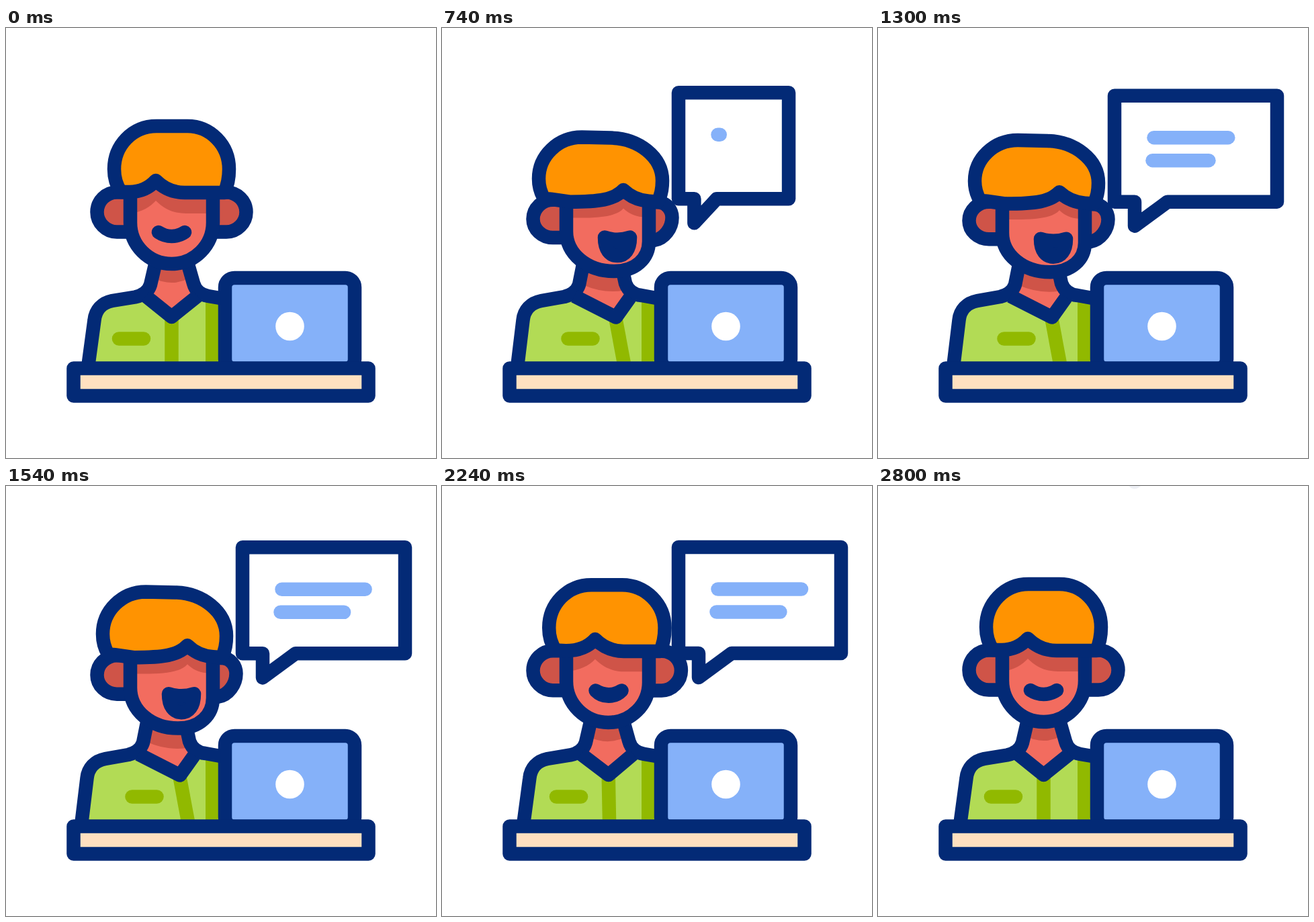
Recreate the animation shown at these times as an HTML page. Size 640 by 640 pixels, loop 3600 ms.

```html
<!DOCTYPE html>
<html lang="en">
<head>
<meta charset="utf-8">
<title>Chat at the desk</title>
<style>
html, body { margin: 0; width: 100%; height: 100%; overflow: hidden; background: #fff; }
svg { display: block; width: 100vw; height: 100vh; }
.ink { stroke: #032a76; stroke-width: 20.5; stroke-linejoin: round; }
.round { stroke-linecap: round; stroke-width: 20.5; }
</style>
</head>
<body>
<svg viewBox="0 0 640 640" fill="none">
  <g id="bubble">
    <path id="box" class="ink" fill="#fff"/>
    <path id="line1" class="round" stroke="#85b1f9"/>
    <path id="line2" class="round" stroke="#85b1f9"/>
  </g>
  <g id="man"></g>
  <rect class="ink" x="326" y="372" width="193" height="135" rx="14" fill="#85b1f9"/>
  <circle cx="422.5" cy="444" r="21.3" fill="#fff"/>
  <rect class="ink" x="100.5" y="506.5" width="439" height="41" fill="#ffe0c0"/>
</svg>
<script>
const LOOP = 3600, SKIN = '#f26c5f', SHADE = '#cf5448', GREEN = '#b2db55', MOSS = '#91b900', HAIR = '#ff9301';
const $ = id => document.getElementById(id);
const lerp = (a, b, p) => a + (b - a) * p;
const ease = (t, from, to) => {
  const u = Math.min(1, Math.max(0, (t - from) / (to - from)));
  return u * u * (3 - 2 * u);
};

// Each part: upright path, leaning path, attributes, whether it bobs with the head.
const parts = [];
function part(attrs, upright, leaning, bobs) {
  const el = document.createElementNS('http://www.w3.org/2000/svg', 'path');
  for (const name in attrs) el.setAttribute(name, attrs[name]);
  $('man').append(el);
  parts.push({ el, upright, goal: leaning.match(/[\d.]+/g).map(Number), bobs });
}
const ink = fill => ({ class: 'ink', fill });

// Neck
part({ fill: SKIN },
  'M222 345 L215 382 L208 399 L246.5 430 L285 399 L279 380 L271 345 Z',
  'M210 345 L204 382 L198 399 L259 430 L280 401 L273 380 L268 345 Z');
part({ fill: SHADE },
  'M220 345 L219 372 Q246 386 274 372 L272 345 Z',
  'M209 345 L210 381 Q238 394 269 390 L269 345 Z', true);

// Shirt
part({ fill: GREEN },
  'M123 500 L131.5 435 C133 420 143 409 158 406 L208 399 L246.5 430 L285 399 L330 404 L330 500 Z',
  'M113 500 L120.5 435 C122 420 132 409 148 406 L198 399 L259 430 L280 401 L330 404 L330 500 Z');
part({ fill: MOSS },
  'M297 400 L330 404 L330 500 L297 500 Z',
  'M297 400 L330 404 L330 500 L297 500 Z');
part({ stroke: MOSS, 'stroke-width': 20.5 }, 'M246.5 430 L246.5 500', 'M258 430 L271 500');
part({ stroke: MOSS, class: 'round' }, 'M168 462.5 L205 462.5', 'M187.5 462.5 L224.5 462.5');
part(ink('none'),
  'M122 505 L131.5 435 C133 420 143 409 158 406 L192 400.5 C204 398 212 392 215 382 L222 352',
  'M112 505 L120.5 435 C122 420 132 409 148 406 L182 400 C194 397 201 391 204 382 L210 352');
part(ink('none'),
  'M271 352 L279 380 C282 391 290 397 301 399 L330 404',
  'M267 352 L273 380 C277 391 285 397 297 398 L330 404');
part(ink('none'), 'M208 399 L246.5 430 L285 399', 'M197 399 L259 430.5 L280 401');

// Ears
part(ink(SHADE),
  'M185 244.5 L165 244.5 C149 244.5 135.5 257.5 135.5 274 C135.5 290 149 303.5 165 303.5 L185 303.5',
  'M185 251 L165 252 C149 252 135.5 265 135.5 281 C135.5 297 149 309.5 165 309.5 L185 309.5', true);
part(ink(SHADE),
  'M308 244.5 L328 244.5 C344 244.5 357.5 257.5 357.5 274 C357.5 290 344 303.5 328 303.5 L308 303.5',
  'M308 255 L324 256 C334 257 342.5 267 342.5 279 C342.5 295 331 311 316 313.5 L308 314', true);

// Face
const face = [
  'M185 245 L185 289.5 C185 323.5 212.5 351 246.5 351 C280.5 351 308 323.5 308 289.5 L308 245',
  'M185 250 L185 300 C185 334 216 360.5 256 360.5 C288 360.5 308 341 308 315 L308 250'];
part({ fill: SKIN }, ...face, true);
part({ fill: SHADE },
  'M185 276 C202 274 215 266 223 257 C236 270 250 276 268 276 L308 276 L308 235 L185 235 Z',
  'M185 279 C220 280 258 280 270 265 C277 272 286 277 298 278 L308 279 L308 245 L185 245 Z', true);
part(ink('none'), ...face, true);
part(ink('#032a76'),
  'M227 304 C239 312 254 312 266 304 C260 308 253 310 246.5 310 C240 310 233 308 227 304 Z',
  'M242 309 C254 313 268 313 280 309 C280 328 272 337 261 337 C250 337 242 328 242 309 Z', true);

// Hair
part(ink(HAIR),
  'M171 244 C164 234 161 222 161 210 C161 175 188 146 224 146 L270 146 C304 146 332 174 332 210 C332 223 330 234 325 245 L266 245 C250 245 235 239 223 227 C213 238 199 244 184 244 L176 244 Z',
  'M152 250 C146 240 144 230 144 220 C144 185 173 157 208 157 L252 158 C292 159 328 186 328 223 C328 235 326 246 321 255 L308 254 C294 253 280 247 270 237 C256 252 234 255 190 255 L162 251 Z', true);

function drawMan(lean, bob) {
  for (const { el, upright, goal, bobs } of parts) {
    let i = 0;
    el.setAttribute('d', upright.replace(/[\d.]+/g, n => {
      let v = lerp(+n, goal[i], lean);
      if (bobs && i % 2) v += (440 - v) * bob * lean * 0.0037;
      i++;
      return v.toFixed(2);
    }));
  }
}

function drawBubble(t, bob) {
  const grow = ease(t, 240, 490), wide = ease(t, 510, 910);
  $('bubble').style.display = t > 240 ? '' : 'none';
  $('bubble').style.opacity = Math.min(1, 1 - (t - 2620) / 192);
  const lift = -291 * ease(t, 2320, 2820);
  const y = v => 354 + grow * (v + bob - 354) + lift;
  const x = (narrow, full) => lerp(narrow, full, wide);
  const right = x(393.3, 594), tail = x(365, 382), joint = x(374, 431);
  $('box').setAttribute('d', `M352 ${y(91)} H${right} V${y(249)} H${joint} L${tail} ${y(285)} V${y(249)} H352 Z`);

  const stretch = 1 - 0.0098 * (bob + 1.3);
  const bar = (id, left, length, top, start) => {
    const p = ease(t, start, start + 200);
    $(id).style.display = p ? '' : 'none';
    $(id).setAttribute('d', `M${left} ${y(top)} h${Math.max(0.01, (length * stretch - 20.5) * p)}`);
  };
  bar('line1', 410.5, 147, 153.5, 720);
  bar('line2', 408.5, 117, 187.5, 800);
}

function frame(now) {
  const t = Math.min(2800, Math.floor(now % LOOP / 20) * 20);
  const swing = t < 2320 ? Math.cos((t - 590) / 692 * 2 * Math.PI) : -1;
  const bob = 5.5 * (1 + swing) - 1.3;
  drawMan(ease(t, 0, 400) - ease(t, 1920, 2320), bob);
  drawBubble(t, bob);
  requestAnimationFrame(frame);
}
frame(0);
</script>
</body>
</html>
```
